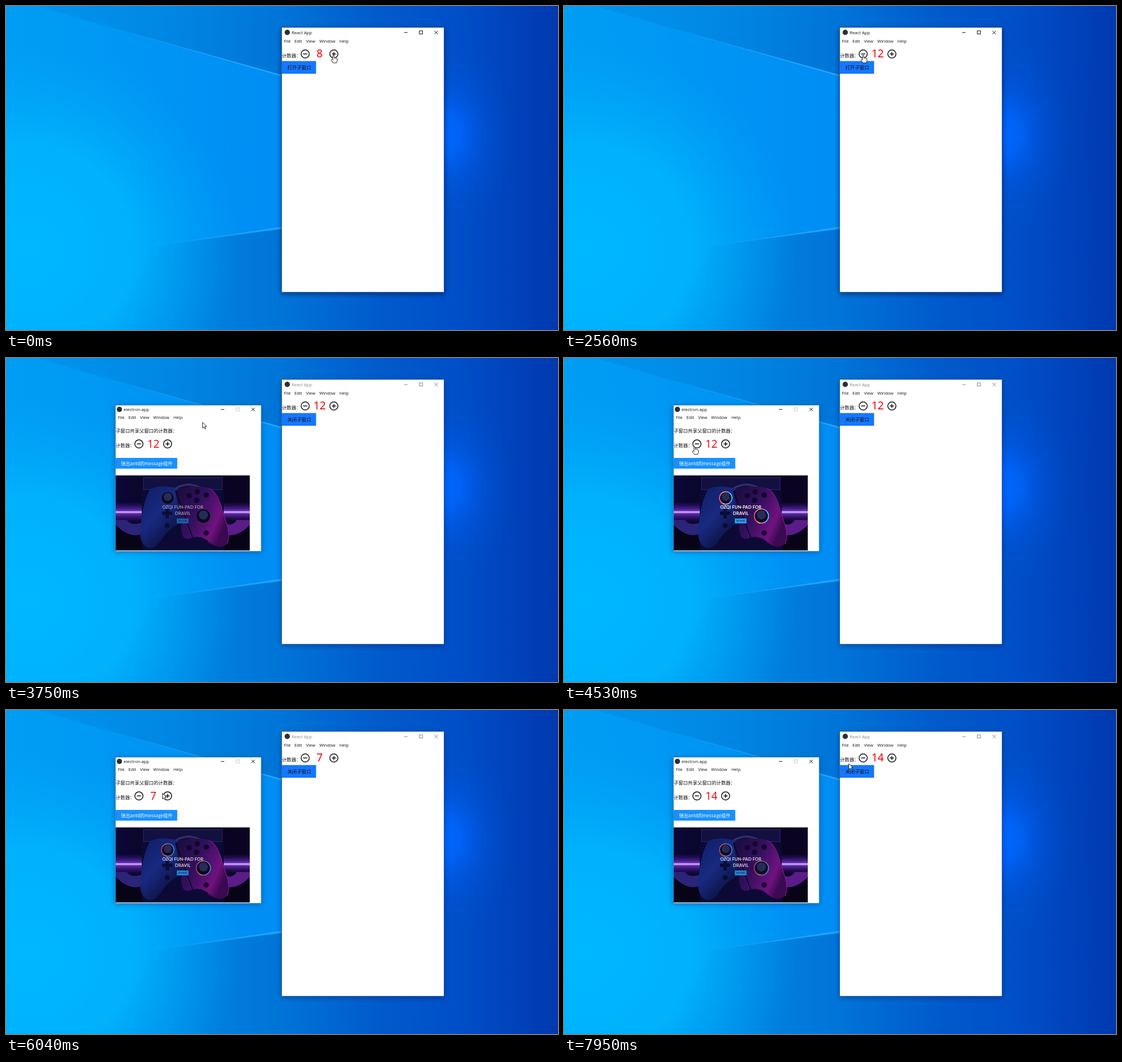
These frames come from a looping animation (976x574 px, 8 s). An HTML page:

```html
<!DOCTYPE html>
<html lang="zh">
<head>
<meta charset="utf-8">
<title>Shared counter</title>
<style>
html, body { margin: 0; width: 100%; height: 100%; overflow: hidden; background: #0078d7; }
svg { display: block; width: 100%; height: 100%; }
text { font-family: "Open Sans", "Noto Sans", sans-serif; font-size: 7.5px; fill: #111; white-space: pre; }
.zh { font-family: "Noto Sans CJK SC", "Noto Sans CJK JP", "Noto Sans CJK", sans-serif; font-size: 8.4px; }
.num { font-family: "Noto Sans", "Open Sans", sans-serif; font-size: 19px; text-anchor: middle; }
.ad { font-family: Lato, "Open Sans", sans-serif; font-weight: 700; font-size: 7.7px; fill: #fff; text-anchor: middle; }
.line { fill: none; stroke: #111; }
</style>
</head>
<body>
<svg id="stage" viewBox="0 0 976 574" preserveAspectRatio="none"></svg>
<script>
const LOOP = 8000;
const stage = document.getElementById('stage');

const label = (x, y, str, cls = '', attr = '') =>
  `<text x="${x}" y="${y}" class="${cls}" ${attr}>${str}</text>`;
const rect = (x, y, w, h, fill, attr = '') =>
  `<rect x="${x}" y="${y}" width="${w}" height="${h}" fill="${fill}" ${attr}/>`;
const dot = (x, y, r, fill, attr = '') =>
  `<circle cx="${x}" cy="${y}" r="${r}" fill="${fill}" ${attr}/>`;
const path = (d, fill, attr = '') => `<path d="${d}" fill="${fill}" ${attr}/>`;
const stops = list => list.map(([o, c, a = 1]) =>
  `<stop offset="${o}" stop-color="${c}" stop-opacity="${a}"/>`).join('');
const linear = (id, list, attr = '') =>
  `<linearGradient id="${id}" ${attr}>${stops(list)}</linearGradient>`;
const radial = (id, list, cx, cy, r, attr = '') =>
  `<radialGradient id="${id}" gradientUnits="userSpaceOnUse" cx="${cx}" cy="${cy}" r="${r}" ${attr}>${stops(list)}</radialGradient>`;

const menu = (xs, y) => ['File', 'Edit', 'View', 'Window', 'Help']
  .map((s, i) => label(xs[i], y, s)).join('');

const caption = (x, y, gap, maxAttr = '') =>
  `<path class="line" d="M${x - 3} ${y}h6"/>` +
  `<rect class="line" x="${x + gap - 3}" y="${y - 3}" width="5.6" height="5.6" ${maxAttr}/>` +
  `<path class="line" d="M${x + 2 * gap - 3} ${y - 3}l6 6m0 -6l-6 6"/>`;

const counter = (x, y, id, red) =>
  label(x, y + 5.5, '计数器：', 'zh') +
  `<g class="line" stroke-width="1.5">
    <circle cx="${x + 41}" cy="${y}" r="7.2"/><path d="M${x + 37.4} ${y}h7.2"/>
    <circle cx="${x + 91.7}" cy="${y}" r="7.2"/><path d="M${x + 88.1} ${y}h7.2m-3.6 -3.6v7.2"/>
  </g>` +
  label(x + 66.5, y + 6.4, '', 'num', `id="${id}" style="fill:${red}"`);

const defs = `<defs>
  ${linear('sky', [[0, '#0098ee'], [.28, '#0088e4'], [.5, '#0074d8'], [.68, '#005acb'], [.82, '#004fc8'], [.93, '#0041ba'], [1, '#0039b0']])}
  ${linear('beam', [[0, '#00a0f6', .7], [1, '#0092fa', .85]])}
  ${linear('ray', [[0, '#38b8ff', .15], [1, '#30b0ff', .75]])}
  ${radial('cyan', [[0, '#00b8ff', 1], [.5, '#00b2fd', .95], [1, '#00a4f8', 0]], 40, 430, 370)}
  ${radial('glow', [[0, '#0066ff', 1], [.2, '#0064fa', .9], [.5, '#0058e4', .5], [1, '#004cc8', 0]], 778, 228, 130, 'gradientTransform="translate(0 -80) scale(1 1.35)"')}
  ${linear('room', [[0, '#0c0736'], [.4, '#080620'], [1, '#0b0322']])}
  ${linear('neon', [[0, '#4a1cb0', 0], [.42, '#8a3cf0', .65], [.5, '#e8c8ff'], [.58, '#8a3cf0', .65], [1, '#3a1290', 0]], 'x2="0" y2="1"')}
  ${linear('padL', [[0, '#101c66'], [.5, '#182a80'], [1, '#0a0c34']], 'x2=".7" y2="1"')}
  ${linear('padR', [[0, '#160b3a'], [.5, '#34105e'], [.85, '#70127e'], [1, '#3a0a50']], 'y2=".5"')}
  ${linear('rgb', [[0, '#ff4a80'], [.35, '#ffc060'], [.6, '#e070ff'], [1, '#38e0ff']])}
  <clipPath id="frame"><rect width="237" height="133"/></clipPath>
  <filter id="blur" x="-20%" y="-20%" width="140%" height="140%"><feGaussianBlur stdDeviation="5"/></filter>
</defs>`;

const wallpaper =
  rect(0, 0, 976, 574, 'url(#sky)') +
  path('M0 0H50L488 123V393L262 425L190 574H0Z', 'url(#beam)') +
  rect(0, 0, 976, 574, 'url(#cyan)') +
  rect(600, 0, 376, 574, 'url(#glow)') +
  path('M50 0L488 122V125L54 0Z', 'url(#ray)') +
  path('M262 425L488 391V395Z', 'url(#ray)');

const main =
  rect(487, 41, 288, 469, '#001038', 'id="shade" filter="url(#blur)"') +
  rect(487.5, 38, 287, 469, '#fff', 'stroke="#0a3c80" stroke-opacity=".6"') +
  dot(497.3, 46.8, 4.7, '#2b2e3a') +
  `<g id="bar">${label(505, 49.7, 'React App', '', 'style="font-size:7.7px"')}${caption(707, 47, 26.8)}</g>` +
  menu([491.5, 510, 530.5, 554, 589.5], 65.2) +
  counter(488, 85, 'numA', '#f40000') +
  rect(488, 97.5, 60.3, 22.5, '#1677ff') +
  label(497.5, 112, '', 'zh', 'id="toggle"');

const sticks = [[92, 40, 11], [155, 72, 12.5]];
const ring = ([x, y, r]) =>
  `<circle cx="${x}" cy="${y}" r="${r}" fill="none" stroke="url(#rgb)" stroke-width="1.7"/>`;
const photo = `<g transform="translate(194 208)" clip-path="url(#frame)">
  ${rect(0, 0, 237, 133, 'url(#room)')}
  ${rect(0, 47, 237, 36, 'url(#neon)')}
  ${path('M0 79H20Q26 90 46 84V104Q24 112 0 88Z', '#2c2478')}
  ${path('M237 79H214Q206 92 190 84V104Q214 112 237 88Z', '#5a1c88')}
  ${path('M0 88Q24 112 46 104V133H0ZM237 88Q214 112 190 104V133H237Z', '#070418')}
  ${rect(46, 24, 145, 109, '#0c0a34')}
  ${rect(49, 4, 139, 21, '#11103f', 'stroke="#3a2c92" stroke-width=".8"')}
  ${path('M104 24Q128 9 152 23', 'none', 'stroke="#343070" stroke-width="3"')}
  ${path('M61 24Q80 15 112 24L118 84Q94 91 78 118Q69 132 55 127Q40 118 44 90Q48 46 61 24Z', 'url(#padL)')}
  ${path('M105 27Q134 15 164 22Q181 28 190 68Q205 104 197 121Q184 133 166 119Q150 103 130 112Q114 116 116 84Z', 'url(#padR)')}
  ${path('M106 28L136 110', 'none', 'stroke="#080520" stroke-width="1.5"')}
  ${path('M164 23Q181 28 190 68Q205 104 197 121', 'none', 'stroke="#9c1c9c" stroke-opacity=".7" stroke-width="1.3"')}
  ${sticks.map(([x, y, r]) => dot(x, y, r, '#090822') + dot(x, y - 2, r * .65, '#272b58')).join('')}
  ${path('M88 59h6v5h6v6h-6v6h-6v-6h-6v-6h6z', '#0a0d38')}
  ${[[144, 29], [143, 44], [160, 35], [130, 36]].map(([x, y]) => dot(x, y, 4.8, '#10072c')).join('')}
  ${dot(91, 89, 4.5, '#0a0d38')}${dot(160, 102, 4.5, '#16062e')}
  <g id="rings">${sticks.map(ring).join('')}</g>
  <g id="ad">
    ${label(118.5, 59.3, 'OZQI FUN-PAD FOR', 'ad')}
    ${label(118.5, 70.4, 'DRAVIL', 'ad')}
    ${rect(108, 76.3, 20.7, 8.7, '#249cf0')}
    ${label(118.4, 81.8, 'BUY NOW', 'ad', 'style="font-size:3px;fill:#0a2c58"')}
  </g>
</g>`;

const child = `<g id="child">
  ${rect(191, 84, 262, 261, '#003a78', 'opacity=".4" filter="url(#blur)"')}
  ${rect(193.5, 83.5, 257.7, 259, '#fff', 'stroke="#1470b8" stroke-opacity=".7"')}
  ${dot(200.5, 91, 4.7, '#2b2e3a')}
  ${label(208, 93.8, 'electron-app', '', 'style="font-size:7.6px;font-weight:500"')}
  ${caption(383, 91.2, 27, 'style="stroke:#ccc"')}
  ${menu([197.7, 216.5, 237, 260.3, 296], 108)}
  ${label(194, 132, '子窗口共享父窗口的计数器：', 'zh')}
  ${counter(194, 152.2, 'numB', '#ec1018')}
  ${rect(194, 177, 108.8, 19, '#1890ff', 'rx="1"')}
  ${label(203.3, 189.6, '弹出antd的message组件', 'zh', 'style="fill:#fff;font-size:8.1px;font-weight:500"')}
  <g id="photo">${photo}</g>
</g>`;

const cursors = `<g id="cursor" stroke="#111" stroke-width=".9" stroke-linejoin="round" fill="#fff">
  <path id="arrow" d="M0 0V10.2L2.4 8L4 11.7L5.7 11L4.2 7.4H7.3Z"/>
  <path id="hand" d="M-1.2 .8Q0 -.6 1.1 .8V5Q2.2 4.2 3.2 5.2Q4.4 4.6 5.1 5.7Q6.5 5.3 6.7 7V10.2L5.4 13.8H-.6L-3.8 9.2Q-4 7.4 -2.4 7.7L-1.2 8.8Z"/>
</g>`;

stage.innerHTML = defs + wallpaper + main + child + cursors;

// [time, counter value]
const counts = [[0, 8], [260, 9], [410, 10], [690, 11], [830, 12], [970, 13], [1110, 14], [1250, 15],
  [2280, 14], [2420, 13], [2560, 12], [4790, 11], [4940, 10], [5080, 9], [5220, 8], [5500, 7],
  [6320, 8], [6440, 9], [6570, 10], [6710, 11], [6850, 12], [6990, 13], [7130, 14]];
// [time, x, y, is hand]
const moves = [[0, 579, 87, 1], [1620, 549, 88, 0], [1770, 538, 87, 0], [1890, 529, 87, 1],
  [2830, 526, 94, 0], [2950, 524.5, 99, 0], [3630, 430, 106, 0], [3750, 347.5, 114, 0],
  [3870, 305, 128, 0], [4000, 268, 142, 0], [4130, 243, 152, 0], [4250, 231, 157, 1],
  [5780, 245, 153, 0], [5900, 262, 150, 0], [6040, 276.5, 147.5, 0], [6190, 285.5, 153, 1],
  [7690, 380, 122, 0], [7820, 465, 104, 0], [7950, 503.5, 95, 0]];

const at = (keys, t) => keys.filter(k => k[0] <= t).pop();
const $ = id => document.getElementById(id);
const el = Object.fromEntries(['shade', 'bar', 'numA', 'numB', 'toggle', 'child', 'photo',
  'rings', 'ad', 'cursor', 'arrow', 'hand'].map(id => [id, $(id)]));
const show = (node, on) => node.setAttribute('visibility', on ? 'visible' : 'hidden');

function draw(t) {
  el.numA.textContent = el.numB.textContent = at(counts, t)[1];

  const [, x, y, isHand] = at(moves, t);
  el.cursor.setAttribute('transform', `translate(${x} ${y})`);
  show(el.arrow, !isHand);
  show(el.hand, isHand);

  el.toggle.textContent = t < 3230 ? '打开子窗口' : '关闭子窗口';
  const active = t < 3350;
  el.bar.setAttribute('opacity', active ? 1 : .5);
  el.shade.setAttribute('opacity', active ? .6 : .35);

  const opening = t < 3630;
  el.child.setAttribute('display', t < 3480 ? 'none' : 'inline');
  el.child.setAttribute('opacity', opening ? .77 : 1);
  el.child.setAttribute('transform',
    opening ? 'translate(322.3 213) scale(.99) translate(-322.3 -213)' : '');
  el.photo.setAttribute('display', opening ? 'none' : 'inline');

  const pulse = .5 + .5 * Math.cos(2 * Math.PI * (t - 4530) / 1910);
  el.rings.setAttribute('opacity', pulse);
  el.ad.setAttribute('opacity', .5 + .5 * pulse);
}

const start = performance.now();
function tick() {
  draw((performance.now() - start) % LOOP);
  requestAnimationFrame(tick);
}
tick();
</script>
</body>
</html>
```
